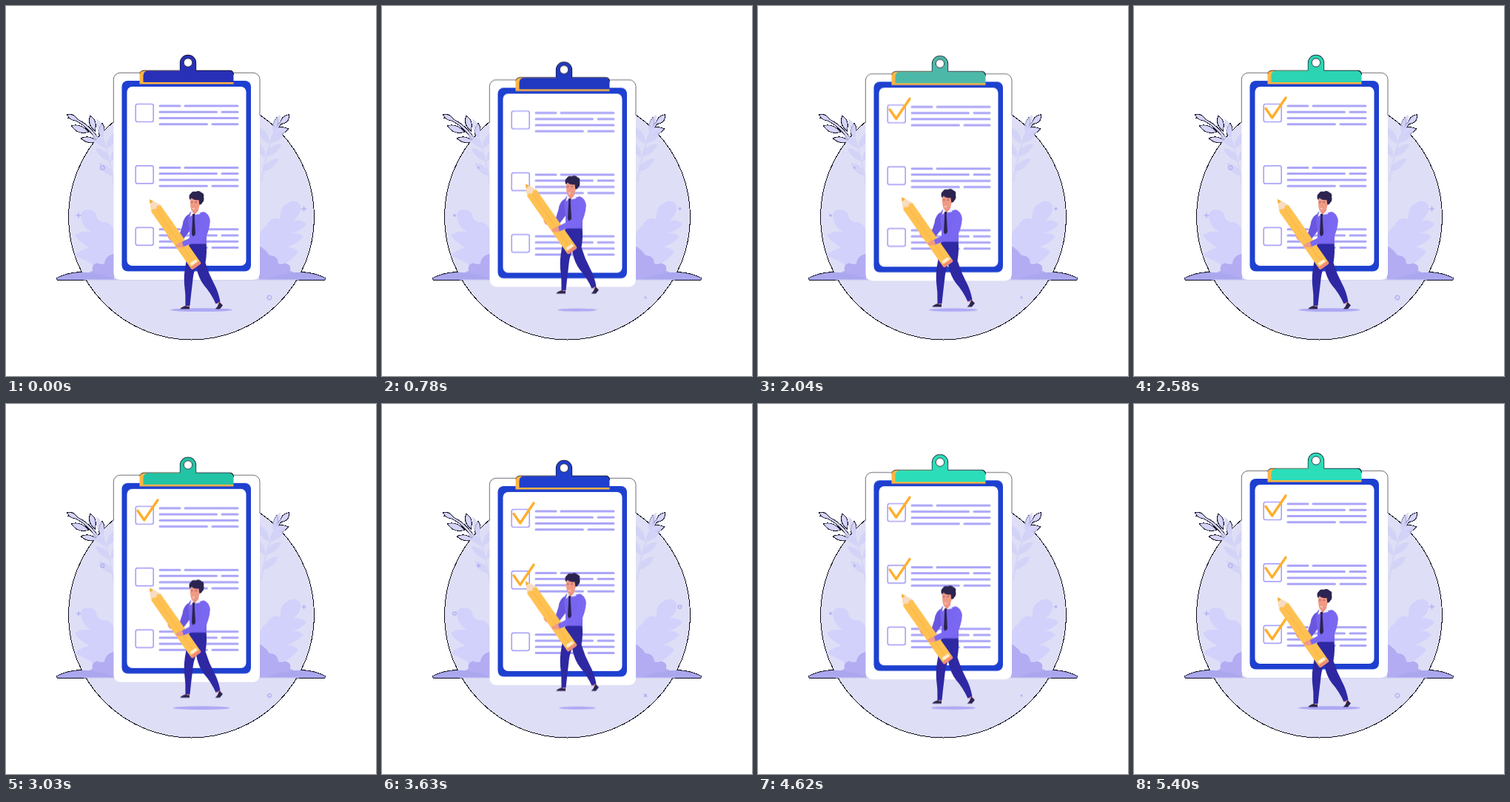
Animation of 500x500 px, one loop 5430 ms. Source, as an HTML page:

```html
<!DOCTYPE html>
<html lang="en">
<head>
<meta charset="utf-8">
<title>Checklist</title>
<style>
  html, body { margin: 0; width: 100%; height: 100%; overflow: hidden; background: #fff; }
  svg { display: block; width: 100vw; height: 100vh; }

  .bob { animation: bob 2715ms infinite; }
  .board { --rise: 10.4px; }
  .man { --rise: -22.8px; }
  @keyframes bob {
    0%, 100% { transform: translateY(0); animation-timing-function: cubic-bezier(.19, 0, .03, 1); }
    50% { transform: translateY(var(--rise)); animation-timing-function: cubic-bezier(.19, 0, .03, 1); }
  }

  .shadow { transform-origin: 264px 410.700px; animation: shrink 2715ms ease-in-out infinite; }
  @keyframes shrink {
    0%, 100% { transform: scale(1); }
    38.7%, 50% { transform: scale(.57, .8); }
  }

  .clip { animation: tint 5430ms linear infinite; }
  @keyframes tint {
    0% { fill: #2930b8; }
    14%, 25% { fill: #2138c0; }
    37.6% { fill: #4cb9a8; }
    43% { fill: #2bd8b5; }
    53% { fill: #2bd0b0; }
    56% { fill: #22c2a5; }
    63%, 75% { fill: #1f40cf; }
    83%, 100% { fill: #2bddb9; }
  }

  .check {
    fill: none; stroke: #ffae2b; stroke-width: 3.4; stroke-linecap: round; stroke-linejoin: round;
    stroke-dasharray: 1 3; animation: 5430ms linear infinite;
  }
  .c1 { animation-name: tick1; }
  .c2 { animation-name: tick2; }
  .c3 { animation-name: tick3; }
  @keyframes tick1 { 0%, 24% { stroke-dashoffset: 1.2; } 31%, 100% { stroke-dashoffset: 0; } }
  @keyframes tick2 { 0%, 57% { stroke-dashoffset: 1.2; } 64%, 100% { stroke-dashoffset: 0; } }
  @keyframes tick3 { 0%, 90% { stroke-dashoffset: 1.2; } 97%, 100% { stroke-dashoffset: 0; } }

  .mark { fill: none; stroke: #a7a2f3; stroke-width: 1.1; }
  .mark use { vector-effect: non-scaling-stroke; }
  .rest { animation: rest 2715ms linear infinite; }
  .swap { animation: swap 2715ms linear infinite; }
  @keyframes rest {
    0%, 100% { transform: scale(1); }
    11.6% { transform: scale(.85); }
    25%, 77% { transform: scale(0); }
    96% { transform: scale(1); }
  }
  @keyframes swap {
    0%, 25% { transform: scale(0); }
    28.7% { transform: scale(.4); }
    33.7% { transform: scale(.8); }
    41%, 55% { transform: scale(1); }
    70%, 75.500% { transform: scale(.4); }
    77%, 100% { transform: scale(0); }
  }

  .edge { stroke: #0c0b1c; stroke-width: 1.8; shape-rendering: crispEdges; }
  .line { fill: none; stroke: #aba5f8; stroke-width: 3; stroke-linecap: round; }
</style>
</head>
<body>
<svg viewBox="0 0 500 500">
  <defs>
    <!-- everything above the disc's rim -->
    <clipPath id="above"><path d="M0 0H500V147H300L200 157H0Z"/></clipPath>

    <path id="plus" d="M-3.6 0H3.6M0-3.6V3.6" vector-effect="non-scaling-stroke"/>
    <circle id="ring" r="2.8" vector-effect="non-scaling-stroke"/>

    <!-- parts that stick out past the disc -->
    <g id="mounds" fill="#aaa7ee">
      <path d="M68.500 368C82 361 98 359 113 360.500Q132 362 150 370H70Q68 370 68.500 368Z"/>
      <path d="M431.500 368C418 361 402 359 387 360.500Q368 362 350 370H430Q432 370 431.500 368Z"/>
    </g>
    <g id="twigs" fill="#d5d4fa">
      <path d="M85 151Q106 157 122 180L124 178Q108 155 86 150Z"/>
      <path d="M83 147Q91 145 97 154Q88 156 83 147Z"/>
      <path d="M89 162Q101 159 111 170Q97 174 89 162Z"/>
      <path d="M114 149Q123 154 120 168Q110 160 114 149Z"/>
      <path d="M130 159Q136 167 128 178Q123 169 130 159Z"/>
      <path d="M102 179Q112 174 123 183Q111 187 102 179Z"/>
      <path d="M381 148Q366 158 357 180L359 181Q369 159 381 148Z"/>
      <path d="M382 147Q383 158 371 159Q372 149 382 147Z"/>
      <path d="M363 166Q371 162 381 166Q374 175 363 174Z"/>
      <path d="M366 151Q370 158 363 168Q359 160 366 151Z"/>
    </g>

    <path id="leaf" d="M0 0Q-15-3-20-18Q-3-16 0 0Z"/>
    <g id="fern">
      <path d="M0 66Q-4 30-20-14" fill="none" stroke="#cfcff7" stroke-width="1.5"/>
      <use href="#leaf" transform="translate(-10 14)"/>
      <use href="#leaf" transform="translate(-5 32)"/>
      <use href="#leaf" transform="translate(-1 52)"/>
      <use href="#leaf" transform="translate(-10 14) rotate(78)"/>
      <use href="#leaf" transform="translate(-5 32) rotate(78)"/>
      <use href="#leaf" transform="translate(-15 0) rotate(30)"/>
    </g>

    <g id="item">
      <rect x="175.200" y="132.500" width="24" height="24" rx="2.500" fill="#fff" stroke="#aba5f8" stroke-width="1.700"/>
      <path class="line" d="M208 135H235M242 135H313M208 143.200H284.500M292 143.200H313M208 151.500H313M208 159.800H271.500M279 159.800H313"/>
    </g>
    <path id="tick" pathLength="1" d="M178 138.500L186.700 151L205 124"/>
  </defs>

  <use href="#mounds" class="edge"/>
  <use href="#twigs" class="edge"/>
  <circle cx="250.500" cy="285" r="165.700" fill="#dedef6"/>
  <circle cx="250.500" cy="285" r="166" fill="none" stroke="#0c0b1c" shape-rendering="crispEdges"/>
  <use href="#twigs"/>

  <g fill="#cfcff7" opacity=".75">
    <use href="#fern" transform="translate(146 178)"/>
    <use href="#fern" transform="translate(345 172) scale(-1.100 1)"/>
  </g>

  <g fill="#d1d1fc">
    <path d="M146 352H120Q106 341 93 338Q101 328 113 327Q100 320 93 310Q104 302 116 306Q102 298 101 283Q102 275 111 275Q122 276 123 287Q127 293 135 292Q143 294 146 303Z"/>
    <path d="M342 352H368Q386 345 395 332Q388 325 379 326Q394 321 402 312Q396 306 386 307Q399 304 406 295Q399 288 388 290Q400 281 398 269Q390 259 378 268Q369 275 371 288Q358 284 352 297Q343 302 342 315Z"/>
  </g>
  <g fill="#b3acf2">
    <path d="M146 370H103Q109 360 117 358Q115 349 123 347.500Q129 350 133 348Q134 337 146 335Z"/>
    <path d="M342 370H397Q392 360 384 358Q386 349 377 347.500Q372 350 368 348Q367 337 356 337Q351 329 342 324Z"/>
  </g>
  <use href="#mounds"/>
  <path d="M105 370H396" stroke="#cbc9f4"/>

  <g class="mark">
    <g transform="translate(98 283)"><use href="#plus" class="rest"/><use href="#ring" class="swap"/></g>
    <g transform="translate(402.500 274)"><use href="#plus" class="rest"/><use href="#ring" class="swap"/></g>
    <g transform="translate(130.300 218.500)"><use href="#ring" class="rest"/><use href="#plus" class="swap"/></g>
    <g transform="translate(356 394) rotate(45)"><use href="#ring" class="rest"/><use href="#plus" class="swap"/></g>
  </g>

  <g class="bob board">
    <rect x="145.500" y="90.500" width="197.500" height="279.500" rx="9" fill="#fff"/>
  </g>
  <g clip-path="url(#above)">
    <g class="bob board" fill="none" stroke="#0c0b1c">
      <rect x="145.300" y="90.300" width="197.700" height="280" rx="9" stroke-width=".8" opacity=".75"/>
      <path d="M181 92Q182 87.500 187 87.500H235.500V77A10.500 10.500 0 0 1 256.500 77V87.500H303Q307 88 307.500 93" stroke-width="1.300"/>
    </g>
  </g>
  <g class="bob board">
    <rect x="156.500" y="101" width="174.500" height="257.500" rx="8" fill="#1e40d0"/>
    <rect x="163.500" y="109" width="161" height="242" rx="7" fill="#fff"/>
    <path d="M180.500 105.500V93Q181 87.500 187 87.500H240V102.500H307.500V105.500Z" fill="#fdb542"/>
    <path class="clip" fill-rule="evenodd" d="M185.500 103V94Q186 87.500 192 87.500H235.500V77A10.500 10.500 0 0 1 256.500 77V87.500H301Q307 88 307.500 94V103ZM240.300 76.500A5.700 5.700 0 1 0 251.700 76.500A5.700 5.700 0 1 0 240.300 76.500Z"/>
    <circle cx="246" cy="76.500" r="5.700" fill="#fff" stroke="#0c0b1c" stroke-width=".8"/>
    <use href="#item"/>
    <use href="#item" y="83.400"/>
    <use href="#item" y="166.800"/>
    <use href="#tick" class="check c1"/>
    <use href="#tick" y="83.400" class="check c2"/>
    <use href="#tick" y="166.800" class="check c3"/>
  </g>

  <ellipse class="shadow" cx="264" cy="410.700" rx="42" ry="2.400" fill="#aea8f4"/>

  <g class="bob man">
    <!-- legs and shoes -->
    <path d="M243 402H248V406H243ZM283 398L288 396L290 402L286 404Z" fill="#f09a84"/>
    <path d="M243 405Q245.500 407 248 405.500V409.500H235.500Q236 407 243 405ZM288.500 400L293 404.500Q291 407 289 409.500H282.500Q286 407 288.500 400Z" fill="#2c2450"/>
    <path d="M248 319H270.500Q272 333 269.500 347Q274 362 281 375Q287 386 289.500 399.500L283.500 402.500Q277 388 268 378Q260 368 257 352Q253 360 252 374Q250 390 248.500 405H242.500Q243 390 241 376Q240 363 243 348Z" fill="#2e28a3"/>

    <!-- far arm -->
    <path d="M248 281Q240 284 238.500 296L234 310L239 316L249 303Z" fill="#6a57e0"/>
    <path d="M222 309L218 311L221 316L228 318Z" fill="#f09a84"/>

    <!-- shirt, neck and tie -->
    <path d="M249 278Q259 281 267 278Q274 280 275.500 289Q274 302 271 309V321.500H247.500Q249 308 247 296Q245 284 249 278Z" fill="#7865f0"/>
    <path d="M252 268H260.500L260 278L254.500 283L250.500 277Z" fill="#e98d78"/>
    <path d="M250.500 275.500L254 281L248.500 285ZM260.800 275L262.500 281L254.500 282.500Z" fill="#eeecff"/>
    <path d="M252 281H255.500L254.700 285L256 308L253.500 314L251 308L252.200 285Z" fill="#2c2450"/>

    <!-- head -->
    <g transform="translate(0 1)">
      <path d="M249.300 259Q248.200 271 251 275.500Q254 279 258.500 275Q263 270 262 258Z" fill="#f09a84"/>
      <path d="M248.500 261Q246 255 249.500 252.500Q252 248.500 256 250Q261 247.500 264 251Q268.500 252.500 267 257Q268.500 262 265.500 264.500Q264 268 261.300 267.500L260.500 261Q254 262 251 258.500Z" fill="#2c2450"/>
      <path d="M250.300 264H252.300M255.500 264H257.700" stroke="#5b3552" stroke-width=".9"/>
      <path d="M251.800 272.500Q253.300 274 255 272.500" fill="none" stroke="#fff" stroke-width=".8"/>
    </g>

    <!-- pencil -->
    <g transform="translate(194 261.300) rotate(55)">
      <path d="M0 0L15-7.700H109Q111-7.700 111-6V6Q111 7.700 109 7.700H15Z" fill="#ffc152"/>
      <path d="M0 0L15-7.700L13-3L16 0L13 4L15 7.700Z" fill="#f8dcc0"/>
      <path d="M0 0L5-2.600V2.600Z" fill="#f4ae35"/>
      <path d="M16 0H101" stroke="#f9b341" stroke-width=".8"/>
      <path d="M102-5H106V5H102Z" fill="#fff0d7"/>
      <path d="M107-7.700H109Q111-7.700 111-6V6Q111 7.700 109 7.700H107Z" fill="#f18b78"/>
    </g>

    <!-- near arm -->
    <path d="M267 280Q275 281 275.800 291Q275 303 269 315Q264 320 254 320L239 325.500L236.500 319.500L253 311Q260 308 263 300Z" fill="#7b68f2"/>
    <path d="M238 319Q231 320.500 229 324Q231 327.500 240 325.500Z" fill="#f09a84"/>
  </g>
</svg>
</body>
</html>
```
